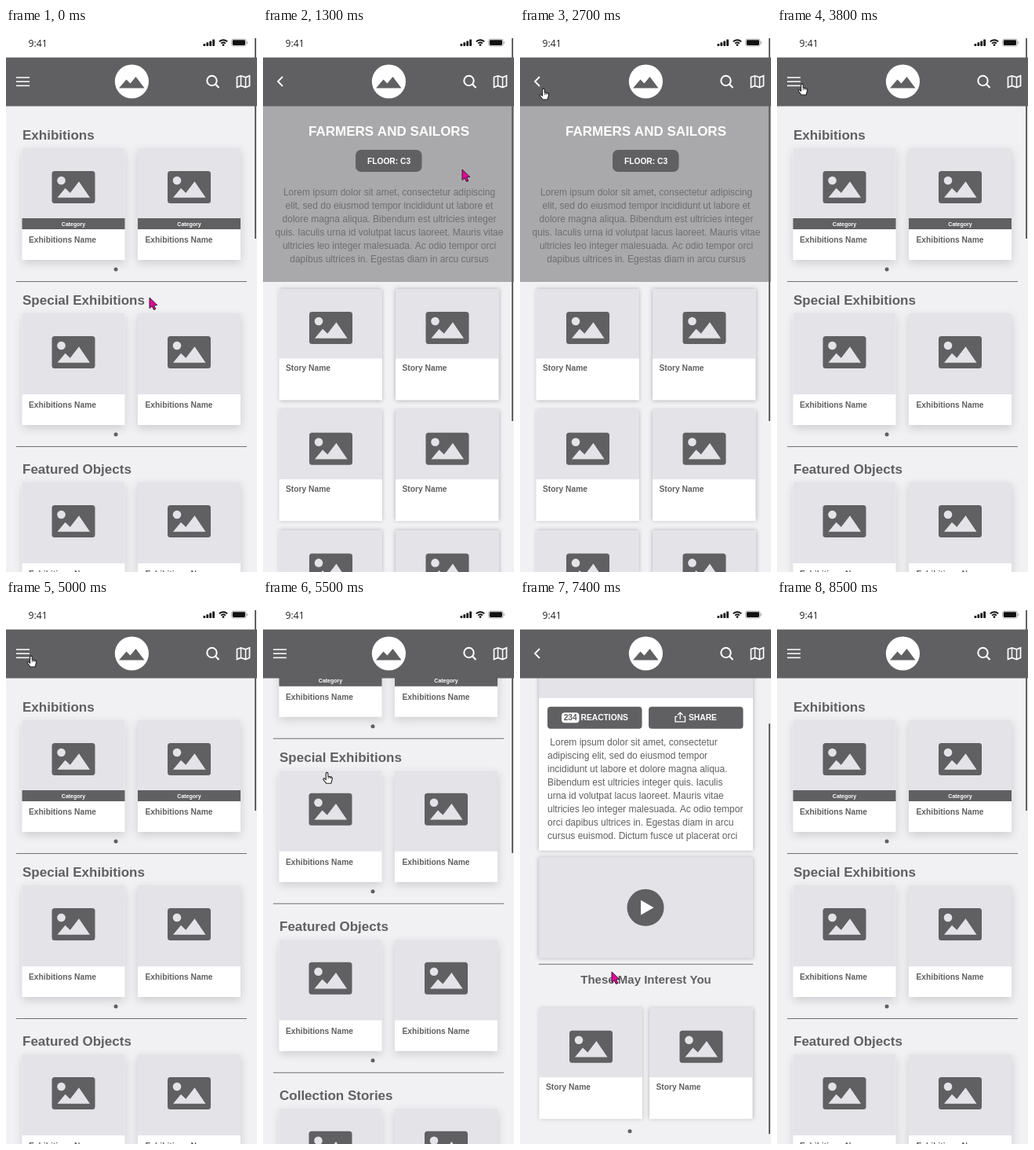
These frames come from a looping animation (320 px wide and 692 px high, 8600 ms). An HTML page with a canvas:

```html
<!DOCTYPE html>
<html lang="en">
<head>
<meta charset="utf-8">
<title>Museum app walkthrough</title>
<style>
html, body { margin: 0; width: 100%; height: 100%; overflow: hidden; background: #f1f1f3; }
canvas { display: block; width: 320px; height: 692px; }
</style>
</head>
<body>
<canvas id="stage"></canvas>
<script>
const W = 320, H = 692, LOOP = 8600;
const DARK = '#606063', PAGE = '#f1f1f3', TINT = '#e3e3e8', WHITE = '#fff';
const SANS = '"Liberation Sans", Arial, sans-serif';
const canvas = document.getElementById('stage');
const ctx = canvas.getContext('2d');
const scale = window.devicePixelRatio || 1;
canvas.width = W * scale;
canvas.height = H * scale;

const sections = ['Exhibitions', 'Special Exhibitions', 'Featured Objects', 'Collection Stories',
  'Recent Stories', "A Village's Morning: Video Stories", 'Stories for Families', 'More to Explore'];
const intro = ['Lorem ipsum dolor sit amet, consectetur adipiscing',
  'elit, sed do eiusmod tempor incididunt ut labore et',
  'dolore magna aliqua. Bibendum est ultricies integer',
  'quis. Iaculis urna id volutpat lacus laoreet. Mauris vitae',
  'ultricies leo integer malesuada. Ac odio tempor orci',
  'dapibus ultrices in. Egestas diam in arcu cursus'];
const article = [' Lorem ipsum dolor sit amet, consectetur',
  'adipiscing elit, sed do eiusmod tempor',
  'incididunt ut labore et dolore magna aliqua.',
  'Bibendum est ultricies integer quis. Iaculis',
  'urna id volutpat lacus laoreet. Mauris vitae',
  'ultricies leo integer malesuada. Ac odio tempor',
  'orci dapibus ultrices in. Egestas diam in arcu',
  'cursus euismod. Dictum fusce ut placerat orci'];

// Drawing helpers
function rect(x, y, w, h, color) {
  ctx.fillStyle = color;
  ctx.fillRect(x, y, w, h);
}

function round(x, y, w, h, r, color) {
  ctx.beginPath();
  ctx.roundRect(x, y, w, h, r);
  ctx.fillStyle = color;
  ctx.fill();
}

function disc(x, y, r, color) {
  ctx.beginPath();
  ctx.arc(x, y, r, 0, Math.PI * 2);
  ctx.fillStyle = color;
  ctx.fill();
}

function trace(points, close) {
  ctx.beginPath();
  points.forEach(([x, y]) => ctx.lineTo(x, y));
  if (close) ctx.closePath();
}

function poly(points, color) {
  trace(points, true);
  ctx.fillStyle = color;
  ctx.fill();
}

function line(points, color, width, close) {
  trace(points, close);
  ctx.strokeStyle = color;
  ctx.lineWidth = width;
  ctx.stroke();
}

function text(str, x, y, size, color = DARK, weight = 'bold', align = 'left', family = SANS) {
  ctx.font = `${weight} ${size}px ${family}`;
  ctx.textAlign = align;
  ctx.fillStyle = color;
  ctx.fillText(str, x, y);
}

function shadowed(blur, dy, alpha, draw) {
  ctx.save();
  ctx.shadowColor = `rgba(60,60,70,${alpha})`;
  ctx.shadowBlur = blur * scale;
  ctx.shadowOffsetY = dy * scale;
  draw();
  ctx.restore();
}

function picture(cx, cy) {
  ctx.save();
  ctx.translate(cx - 27.5, cy - 20.5);
  round(0, 0, 55, 41, 3.5, DARK);
  disc(12, 12, 5.3, TINT);
  poly([[7, 33.7], [17, 21.7], [23.3, 27.8], [34.5, 13.2], [48.5, 33.7]], TINT);
  ctx.restore();
}

// Pages, drawn in scrolled coordinates
function homeCard(x, y, tagged) {
  shadowed(11, 4, 0.2, () => rect(x, y + 17, 131, 142, WHITE));
  rect(x, y + 17, 131, 103, TINT);
  picture(x + 65.5, y + 66.5);
  if (tagged) {
    rect(x, y + 106, 131, 14, DARK);
    text('Category', x + 65.5, y + 115.5, 7, WHITE, 'bold', 'center');
  }
  text('Exhibitions Name', x + 8.5 + (x > 100 ? 1 : 0), y + 137, 10.25);
}

function home() {
  sections.forEach((name, i) => {
    const y = i ? 131 + 215 * i : 136;
    text(name, 21, y + 6, 17);
    homeCard(20.5, y, i === 0);
    homeCard(168, y, i === 0);
    disc(140, y + 171, 2.5, DARK);
    rect(13, y + 186, 294, 1, '#707073');
  });
}

function storyCard(x, y) {
  shadowed(5, 0, 0.38, () => rect(x, y, 131.5, 141.5, WHITE));
  rect(x, y, 131.5, 88.5, TINT);
  picture(x + 66, y + 49.5);
  text('Story Name', x + 8.5, y + 104, 10.25);
}

function gallery() {
  rect(0, 99, W, 224, '#a9a9ab');
  text('FARMERS AND SAILORS', 160.5, 137, 17, WHITE, 'bold', 'center');
  round(118, 155, 84.5, 28, 7, DARK);
  text('FLOOR: C3', 160.5, 172.5, 10.25, WHITE, 'bold', 'center');
  intro.forEach((s, i) => text(s, 161, 213 + 17 * i, 12, '#6e6e71', 'normal', 'center'));
  for (let row = 0; row < 4; row++) {
    storyCard(20.5, 332 + 153.7 * row);
    storyCard(169, 332 + 153.7 * row);
  }
}

function story() {
  shadowed(5, 0, 0.38, () => rect(24, 120, 273, 390, WHITE));
  rect(24, 120, 273, 196, TINT);
  picture(160.5, 218);
  round(35, 327, 120.5, 28, 4, DARK);
  round(164, 327, 120.5, 28, 4, DARK);
  round(53, 334.5, 22.5, 13, 4, WHITE);
  text('234', 64.2, 344.7, 10.25, DARK, 'bold', 'center');
  text('REACTIONS', 77.5, 344.7, 10.25, WHITE);
  text('SHARE', 215, 344.7, 10.25, WHITE);
  line([[200.5, 339.5], [198, 339.5], [198, 346], [210.5, 346], [210.5, 339.5], [208, 339.5]], WHITE, 1.3);
  line([[204.2, 343], [204.2, 335]], WHITE, 1.3);
  line([[201, 337.5], [204.2, 334.3], [207.4, 337.5]], WHITE, 1.3);
  article.forEach((s, i) => text(s, 35, 376 + 17 * i, 12, DARK, 'normal'));
  shadowed(5, 0, 0.38, () => rect(24, 518, 273, 129, TINT));
  disc(160, 582.5, 23.5, DARK);
  poly([[154, 573], [154, 592], [170.5, 582.5]], WHITE);
  rect(24, 654, 273, 1, '#707073');
  text('These May Interest You', 160.5, 679, 15, DARK, 'bold', 'center');
  storyCard(24.5, 710);
  storyCard(165, 710);
  disc(140, 867, 2.5, DARK);
}

const pages = {
  home: { draw: home, thumb: 255 },
  gallery: { draw: gallery, thumb: 487, back: true },
  story: { draw: story, thumb: 522, back: true }
};

// Fixed chrome
function statusBar() {
  rect(0, 0, W, 38, WHITE);
  text('9:41', 28.5, 24.3, 12.2, '#222', 'normal', 'left', '"Open Sans", "Noto Sans", sans-serif');
  for (let i = 0; i < 4; i++) round(251.5 + 3.9 * i, 20 - 1.8 * i, 2.8, 3 + 1.8 * i, 0.7, '#111');
  ctx.strokeStyle = '#111';
  ctx.lineWidth = 1.9;
  for (const r of [3.9, 7.1]) {
    ctx.beginPath();
    ctx.arc(277, 22.3, r, -Math.PI * 0.76, -Math.PI * 0.24);
    ctx.stroke();
  }
  disc(277, 21.6, 1.4, '#111');
  ctx.beginPath();
  ctx.roundRect(287.6, 14.2, 18.6, 8.8, 2.4);
  ctx.strokeStyle = '#999';
  ctx.lineWidth = 0.8;
  ctx.stroke();
  round(288.8, 15.3, 16.2, 6.6, 1.4, '#111');
  rect(306.8, 17.3, 1, 2.8, '#999');
}

function header(back) {
  rect(0, 37.5, W, 62, DARK);
  if (back) line([[25, 62], [19, 68], [25, 74]], WHITE, 1.8);
  else for (const y of [63, 68.2, 73.4]) line([[13, y], [30, y]], WHITE, 1.5);
  disc(160.4, 68, 21.6, WHITE);
  poly([[144, 76.5], [153.5, 65.5], [158.5, 70.5], [165.5, 62], [176.5, 76.5]], DARK);
  ctx.beginPath();
  ctx.arc(262.5, 67, 6.2, 0, Math.PI * 2);
  ctx.strokeStyle = WHITE;
  ctx.lineWidth = 2;
  ctx.stroke();
  line([[267, 71.5], [271.5, 76]], WHITE, 2.2);
  line([[294.5, 62.5], [299.5, 60.8], [305.5, 62.8], [310.5, 60.8], [310.5, 73.5],
    [305.5, 75.5], [299.5, 73.5], [294.5, 75.5]], WHITE, 1.7, true);
  line([[299.5, 61], [299.5, 73.5]], WHITE, 1.5);
  line([[305.5, 63], [305.5, 75.3]], WHITE, 1.5);
}

function arrow() {
  trace([[0, 0], [0, 13.5], [3.2, 10.8], [5.5, 15.5], [7.8, 14.4], [5.6, 9.8], [9.8, 9.4]], true);
  ctx.fillStyle = '#df0a97';
  ctx.fill();
  ctx.strokeStyle = '#3d1230';
  ctx.lineWidth = 1;
  ctx.stroke();
}

function hand() {
  ctx.beginPath();
  ctx.moveTo(-1.4, 1);
  ctx.quadraticCurveTo(0, -0.8, 1.2, 1);
  ctx.lineTo(1.3, 5);
  ctx.lineTo(5.2, 5.8);
  ctx.quadraticCurveTo(7, 6.3, 6.8, 8);
  ctx.lineTo(5.7, 12);
  ctx.lineTo(5.2, 14);
  ctx.lineTo(-1, 14);
  ctx.lineTo(-4.6, 9.3);
  ctx.quadraticCurveTo(-5.2, 7.4, -3.4, 7.6);
  ctx.lineTo(-1.4, 9.3);
  ctx.closePath();
  ctx.fillStyle = WHITE;
  ctx.fill();
  ctx.strokeStyle = '#222';
  ctx.lineWidth = 1.1;
  ctx.stroke();
  for (const x of [1.4, 3.3, 5.1]) line([[x, 5.5], [x, 8]], '#222', 0.7);
}

// Timeline: page cuts, scroll keys [time, offset], pointer keys [time, x, y, shape]
const cuts = [[0, 'home'], [1000, 'gallery'], [2800, 'home'], [6400, 'story'], [8200, 'home']];
const scrolls = {
  0: [[0, 0], [80, 0], [400, 300], [480, 300], [800, 0]],
  1000: [[1850, 0], [2150, 261], [2250, 261], [2500, 0]],
  2800: [[5300, 0], [6100, 936]],
  6400: [[6800, 0], [6880, 198], [7350, 198], [7800, 0]],
  8200: [[8200, 0]]
};
const pointer = [[0, 183, 343, arrow], [700, 183, 343, arrow], [930, 254, 180, hand],
  [1000, 254, 180, arrow], [2400, 254, 180, arrow], [2650, 30, 77, hand], [2800, 30, 77, hand],
  [3100, 32, 71, hand], [5150, 32, 71, hand], [5800, 121, 337, hand], [6400, 121, 337, arrow],
  [6900, 121, 337, arrow], [7250, 117, 473, arrow], [7700, 117, 473, arrow],
  [8050, 24, 68, hand], [8300, 24, 68, null]];

const smooth = u => u * u * (3 - 2 * u);

function sample(keys, t) {
  let i = 0;
  while (i < keys.length - 1 && keys[i + 1][0] <= t) i++;
  const a = keys[i], b = keys[i + 1];
  if (!b || t <= a[0]) return a;
  const u = smooth((t - a[0]) / (b[0] - a[0]));
  return a.map((v, k) => typeof v === 'number' ? v + (b[k] - v) * u : v);
}

function render(t) {
  const [start, name] = cuts.filter(c => c[0] <= t).pop();
  const page = pages[name];
  const offset = sample(scrolls[start], t)[1];
  ctx.setTransform(scale, 0, 0, scale, 0, 0);
  rect(0, 0, W, H, PAGE);
  ctx.save();
  ctx.translate(0, -offset);
  page.draw();
  ctx.restore();
  statusBar();
  header(page.back);
  rect(317, 13 + offset * page.thumb / H, 2, page.thumb, DARK);
  const [, x, y, shape] = sample(pointer, t);
  if (shape) {
    ctx.save();
    ctx.translate(x, y);
    shape();
    ctx.restore();
  }
}

let begin = null;
function tick(now) {
  if (begin === null) begin = now;
  render((now - begin) % LOOP);
  requestAnimationFrame(tick);
}
render(0);
requestAnimationFrame(tick);
</script>
</body>
</html>
```
